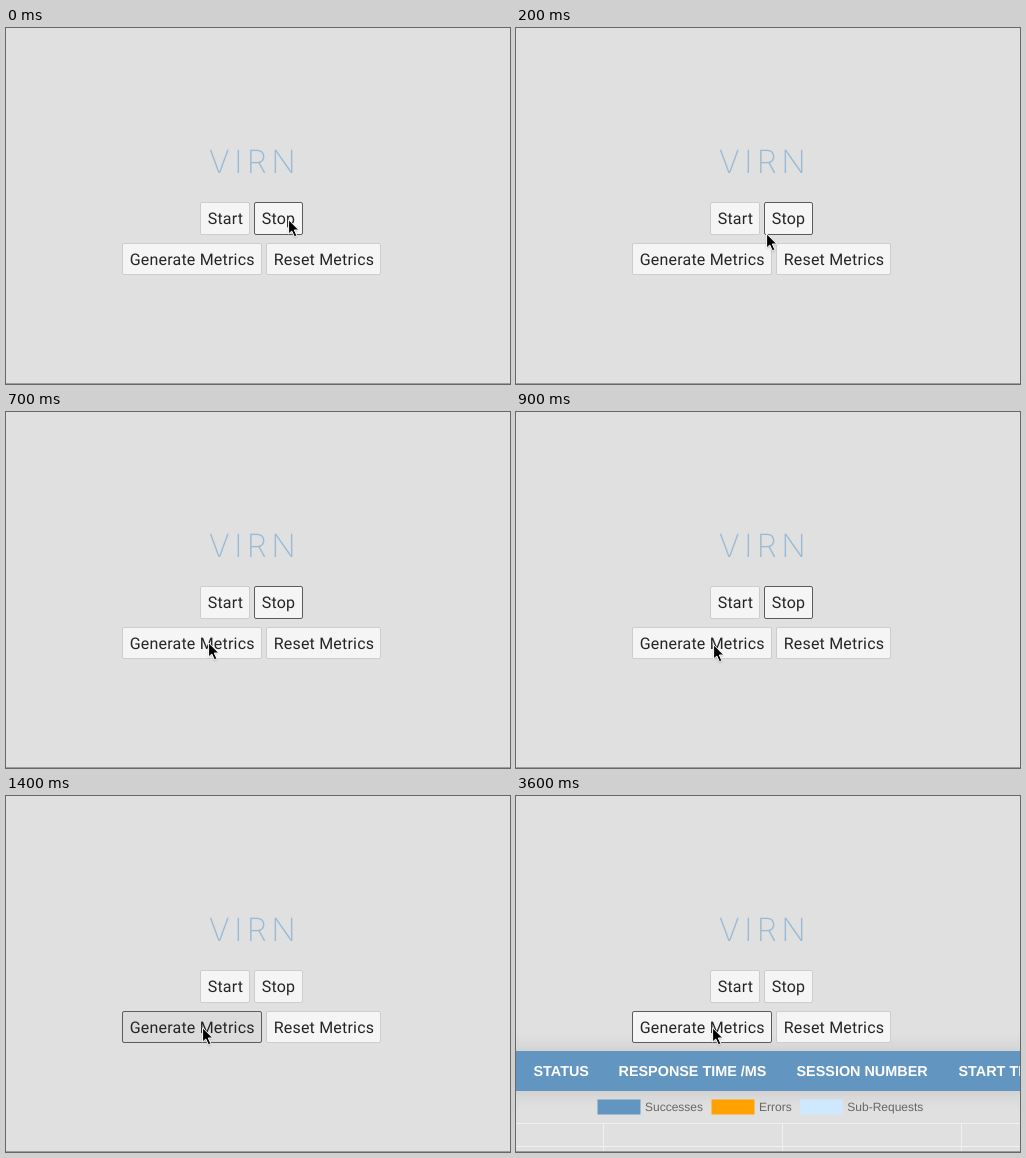
These frames come from a looping animation (504 by 356 pixels, 4300 ms). An HTML page with a canvas:

```html
<!DOCTYPE html>
<html lang="en">
<head>
<meta charset="utf-8">
<title>Metrics</title>
<style>
  html, body { margin: 0; width: 100%; height: 100%; overflow: hidden; background: #e0e0e0; }
  canvas { display: block; width: 504px; height: 356px; }
</style>
</head>
<body>
<canvas id="stage"></canvas>
<script>
const W = 504, H = 356, LOOP = 4300;
const BLUE = '#6295bf';
const PRESS = 1400, TABLE = 1700, CHART = 3600;

const canvas = document.getElementById('stage');
const ctx = canvas.getContext('2d');
const dpr = window.devicePixelRatio || 1;
canvas.width = W * dpr;
canvas.height = H * dpr;
ctx.scale(dpr, dpr);
ctx.textRendering = 'geometricPrecision';

// Pointer stops: time, x, y
const path = [
  [0, 282, 191], [100, 267, 197], [200, 250, 205], [300, 236, 213],
  [400, 223, 221], [500, 212, 227], [600, 206, 229], [700, 202, 230],
  [800, 198, 231], [900, 197, 232], [1100, 196, 231]
];

function rect(x, y, w, h, color) {
  ctx.fillStyle = color;
  ctx.fillRect(x, y, w, h);
}

function text(str, x, y, font, color, spacing = 0, align = 'left') {
  ctx.font = font;
  ctx.letterSpacing = spacing + 'px';
  ctx.textAlign = align;
  ctx.fillStyle = color;
  ctx.fillText(str, x, y);
}

function button(label, x, y, w, h, focused, pressed) {
  ctx.beginPath();
  ctx.roundRect(x + 0.5, y + 0.5, w - 1, h - 1, 1.5);
  ctx.fillStyle = pressed ? '#dcdcdc' : '#f5f5f5';
  ctx.fill();
  ctx.lineWidth = 1;
  ctx.strokeStyle = focused ? '#5c5c5c' : '#cdcdcd';
  ctx.stroke();
  text(label, x + 7.7, y + 22, '16px Roboto, Inter, sans-serif', '#252525', 0.2);
}

function header() {
  ctx.save();
  ctx.shadowColor = 'rgba(0,0,0,0.12)';
  ctx.shadowBlur = 20 * dpr;
  rect(-40, 255, W + 80, 40, BLUE);
  ctx.restore();
  const font = 'bold 14.4px "Liberation Sans", Arial, sans-serif';
  const columns = [['STATUS', 17.5], ['RESPONSE TIME /MS', 102.5],
                   ['SESSION NUMBER', 280.5], ['START TIME', 442.5]];
  for (const [label, x] of columns) text(label, x, 280, font, '#fff');
}

function chart() {
  const font = '12px "Liberation Sans", Arial, sans-serif';
  const items = [['Successes', BLUE, 83], ['Errors', '#ffa200', 197],
                 ['Sub-Requests', '#d0e8fd', 285.3]];
  for (const [label, color, x] of items) {
    rect(x - 1.5, 303.5, 43, 15, color);
    text(label, x + 46, 315, font, '#666');
  }
  for (const y of [327, 350]) rect(0, y, W, 1, '#f0f0f0');
  for (const x of [87, 266, 445]) rect(x, 327, 1, H - 327, '#f0f0f0');
}

function pointer(x, y) {
  const shape = [[0, 0], [0, 14.2], [3.2, 11.2], [5.8, 17], [8.3, 15.9],
                 [5.7, 10.2], [10.2, 10.2]];
  ctx.save();
  ctx.translate(x + 0.6, y + 0.8);
  ctx.beginPath();
  for (const [px, py] of shape) ctx.lineTo(px, py);
  ctx.closePath();
  ctx.shadowColor = 'rgba(0,0,0,0.3)';
  ctx.shadowBlur = 2 * dpr;
  ctx.shadowOffsetY = dpr;
  ctx.fillStyle = '#000';
  ctx.fill();
  ctx.shadowColor = 'transparent';
  ctx.lineWidth = 1;
  ctx.strokeStyle = '#fff';
  ctx.stroke();
  ctx.restore();
}

function draw(t) {
  const clicked = t >= PRESS;
  rect(0, 0, W, H, '#e0e0e0');
  if (t >= TABLE) header();
  if (t >= CHART) chart();
  rect(0, 355, W, 1, '#9c9c9c');

  text('VIRN', 248.5, 145, '200 32px Inter, Roboto, sans-serif', '#9bbad6', 4.5, 'center');
  button('Start', 194, 174, 50, 33);
  button('Stop', 248, 174, 49, 33, !clicked);
  button('Generate Metrics', 116, 215, 140, 32, clicked, clicked && t < TABLE);
  button('Reset Metrics', 260, 215, 115, 32);

  const [, x, y] = path.findLast(p => p[0] <= t);
  pointer(x, y);
}

const start = performance.now();
function tick() {
  draw((performance.now() - start) % LOOP);
  requestAnimationFrame(tick);
}
tick();
</script>
</body>
</html>
```
